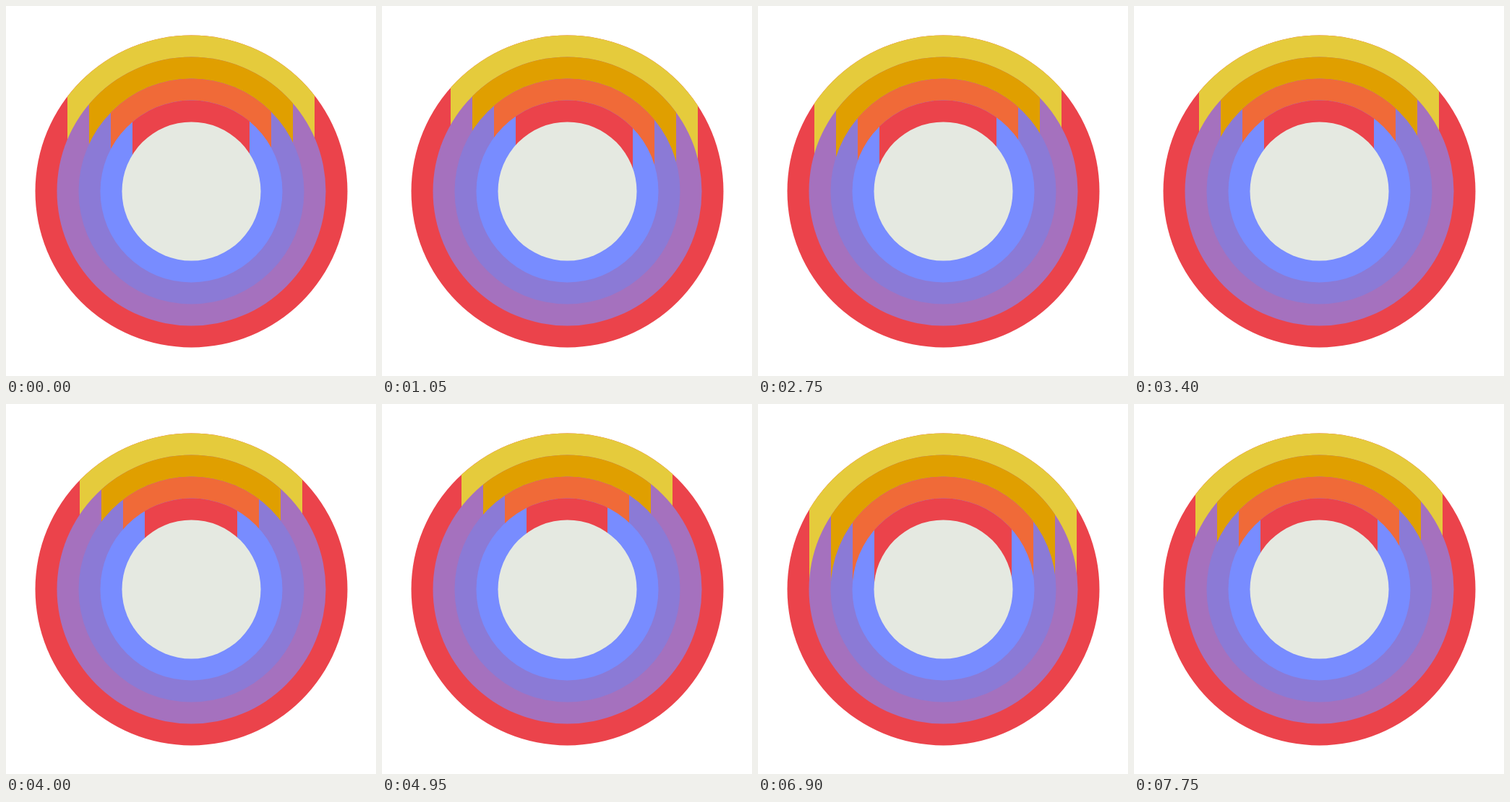
An HTML page with a canvas for the animation above (7800 ms loop, 512x512 px).

```html
<!DOCTYPE html>
<html lang="en">
<head>
<meta charset="utf-8">
<title>Sliding rings</title>
<style>
  html, body { margin: 0; height: 100%; overflow: hidden; background: #fff; }
  canvas { display: block; }
</style>
</head>
<body>
<canvas id="stage" width="512" height="512"></canvas>
<script>
const ctx = document.getElementById('stage').getContext('2d');
const TICK = 50, TICKS = 156, MID = 256.5;

// Outer radius, lower colour, upper colour
const rings = [
  [216, '#eb434b', '#e5cb3c'],
  [186, '#a571be', '#e09f00'],
  [156, '#8b7ad6', '#f06a38'],
  [126, '#788cff', '#eb434b']
];

// One pixel per tick; each turn holds its end position for one extra tick.
function pose(k) {
  if (k < 16) return { shift: k, grow: 0 };
  if (k < 47) return { shift: 31 - k, grow: 0 };
  if (k < 63) return { shift: k - 62, grow: 0 };
  if (k < 94) return { shift: 0, grow: 63 - k };
  if (k < 140) return { shift: 0, grow: k - 124 };
  return { shift: 0, grow: 155 - k };
}

function disc(radius, color) {
  ctx.fillStyle = color;
  ctx.beginPath();
  ctx.arc(MID, MID, radius, 0, Math.PI * 2);
  ctx.fill();
}

function draw(k) {
  const { shift, grow } = pose(k);
  ctx.fillStyle = '#fff';
  ctx.fillRect(0, 0, 512, 512);
  for (const [radius, lower, upper] of rings) {
    const half = radius - 45 + grow;
    disc(radius, lower);
    ctx.save();
    ctx.beginPath();
    ctx.rect(256 + shift - half, 0, half * 2, 256);
    ctx.clip();
    disc(radius, upper);
    ctx.restore();
  }
  disc(96, '#e5e9e1');
}

const start = performance.now();
function loop() {
  draw(Math.floor((performance.now() - start) / TICK) % TICKS);
  requestAnimationFrame(loop);
}
loop();
</script>
</body>
</html>
```
